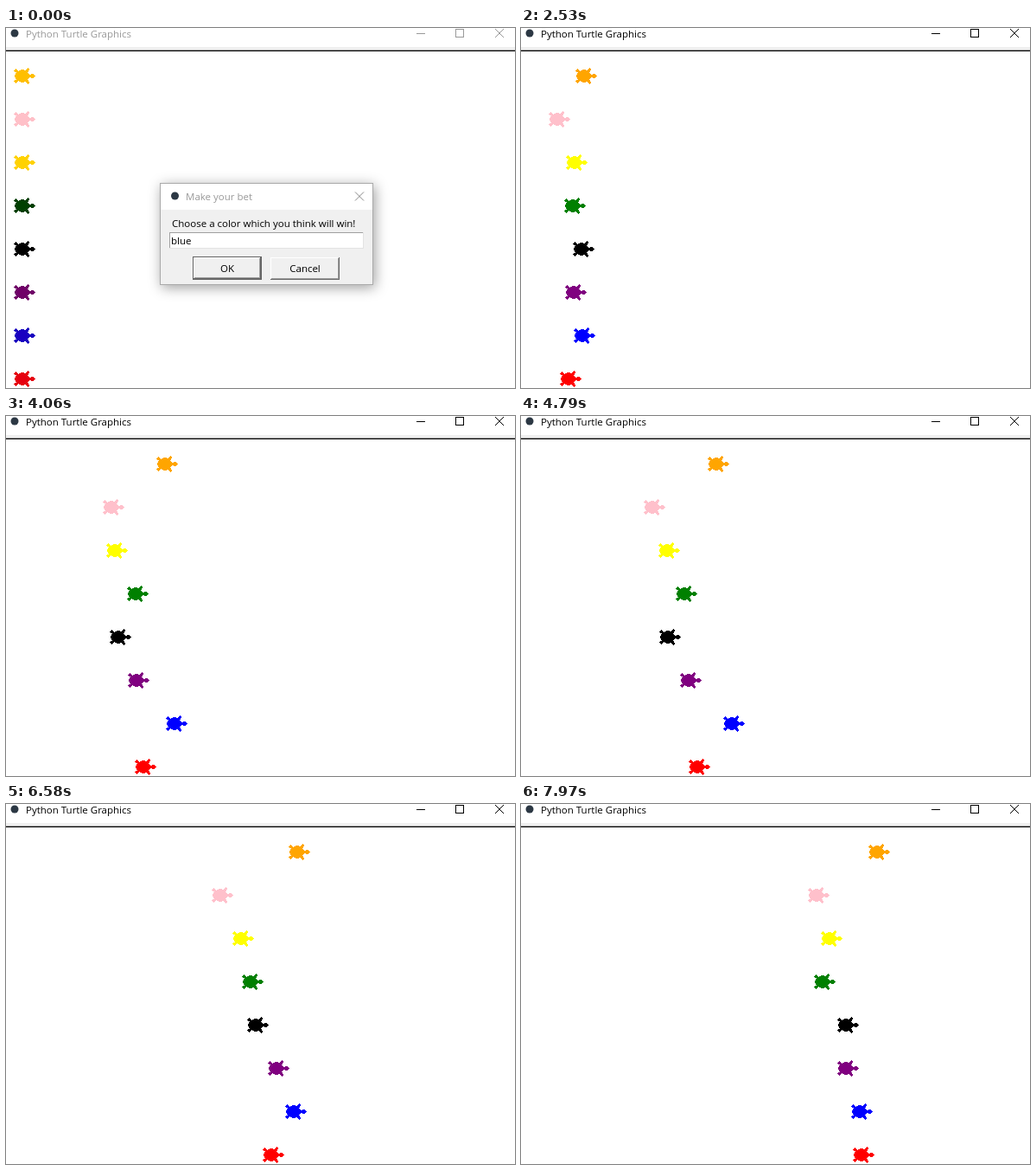
These frames come from a looping animation (589x416 px, 8 s). An HTML page with a canvas:

```html
<!DOCTYPE html>
<html lang="en">
<head>
<meta charset="utf-8">
<title>Turtle race</title>
<style>
  html, body { margin: 0; width: 100%; height: 100%; overflow: hidden; background: #fff; }
  canvas { display: block; }
</style>
</head>
<body>
<canvas id="stage" width="589" height="416"></canvas>
<script>
const ctx = document.getElementById('stage').getContext('2d');
const LOOP = 8000, CURSOR_IN = 330, CLICK = 1530, RACE = 1730, STEP = 66.37;
const FONT = '"Open Sans", "Noto Sans", sans-serif';

// Distance run at each of these times; extra holds [time, distance] pairs.
const TIMES = [1730, 2530, 4060, 5520, 6580, 7970];
const racers = [
  { idle: '#ffbf00', color: '#ffa500', run: [0, 54, 166, 248, 318, 393], extra: [[5980, 273], [6840, 331], [7710, 380]] },
  { idle: '#ffc0c8', color: '#ffc0cb', run: [0, 23, 103, 181, 229, 323],
    extra: [[3390, 74], [4260, 106], [5120, 151], [5980, 211], [6840, 244], [7710, 311]] },
  { idle: '#ffd200', color: '#ffff00', run: [0, 43, 107, 194, 253, 338] },
  { idle: '#004000', color: '#008000', run: [0, 41, 131, 210, 264, 330] },
  { idle: '#000000', color: '#000000', run: [0, 51, 111, 192, 270, 357] },
  { idle: '#700068', color: '#800080', run: [0, 42, 132, 219, 294, 357] },
  { idle: '#1a00c0', color: '#0000ff', run: [0, 52, 177, 258, 314, 373], extra: [[3390, 125], [4260, 195], [5120, 244], [5980, 274]] },
  { idle: '#e60010', color: '#ff0000', run: [0, 36, 140, 230, 288, 375] },
];

// Upper half of the turtle outline, nose first, heading right.
const HALF = [[16, 0], [14, 2], [10, 1], [7, 4], [9, 7], [8, 9], [5, 6], [1, 7],
  [-3, 5], [-6, 8], [-8, 6], [-5, 4], [-7, 0]];
const TURTLE = HALF.concat(HALF.slice(1, -1).reverse().map(([x, y]) => [x, -y]));
const ARROW = [[0, 0], [0, 16], [4, 12.5], [6.6, 18.3], [9, 17.3], [6.5, 11.5], [11.3, 11.5]];

function trace(c, points, x, y) {
  c.beginPath();
  points.forEach(([px, py]) => c.lineTo(x + px, y + py));
  c.closePath();
}

// Hard-edged turtle picture, centred on pixel (10, 10).
function makeSprite(color) {
  const sprite = document.createElement('canvas');
  sprite.width = 30;
  sprite.height = 21;
  const c = sprite.getContext('2d');
  c.fillStyle = c.strokeStyle = color;
  trace(c, TURTLE, 10.5, 10.5);
  c.fill();
  c.stroke();
  const img = c.getImageData(0, 0, 30, 21);
  const rgb = [1, 3, 5].map(i => parseInt(color.slice(i, i + 2), 16));
  for (let i = 0; i < img.data.length; i += 4) {
    img.data.set([...rgb, img.data[i + 3] > 120 ? 255 : 0], i);
  }
  c.putImageData(img, 0, 0);
  return sprite;
}

for (const r of racers) {
  r.idleSprite = makeSprite(r.idle);
  r.sprite = makeSprite(r.color);
  r.keys = TIMES.map((t, i) => [t, r.run[i]]).concat(r.extra || []).sort((a, b) => a[0] - b[0]);
}

function distance(keys, t) {
  if (t <= keys[0][0]) return 0;
  const i = keys.findIndex(k => k[0] >= t);
  if (i < 0) return keys[keys.length - 1][1];
  const [t0, d0] = keys[i - 1], [t1, d1] = keys[i];
  return Math.round(d0 + (d1 - d0) * (t - t0) / (t1 - t0));
}

function rect(x, y, w, h, color) {
  ctx.fillStyle = color;
  ctx.fillRect(x, y, w, h);
}

function frame(x, y, w, h, light, dark = light) {
  rect(x, y, w, 1, light);
  rect(x, y, 1, h, light);
  rect(x, y + h - 1, w, 1, dark);
  rect(x + w - 1, y, 1, h, dark);
}

function text(str, x, y, color, align = 'left') {
  ctx.font = '11.5px ' + FONT;
  ctx.textAlign = align;
  ctx.fillStyle = color;
  ctx.fillText(str, x, y);
}

function dot(x, y) {
  ctx.fillStyle = '#2c3844';
  ctx.beginPath();
  ctx.arc(x, y, 4.5, 0, Math.PI * 2);
  ctx.fill();
}

function cross(x, y, color) {
  ctx.strokeStyle = color;
  ctx.lineWidth = 1;
  ctx.beginPath();
  ctx.moveTo(x, y);
  ctx.lineTo(x + 10, y + 10);
  ctx.moveTo(x + 10, y);
  ctx.lineTo(x, y + 10);
  ctx.stroke();
}

function drawWindow(active) {
  const ink = active ? '#000' : '#999';
  rect(0, 0, 589, 416, '#fff');
  dot(10, 6);
  text('Python Turtle Graphics', 23, 11, ink);
  rect(475, 6, 10, 1, ink);
  frame(520, 1, 10, 10, ink);
  cross(566, 1, ink);
  rect(0, 22, 589, 3, '#f0f0f0');
  rect(0, 25, 589, 1, '#a0a0a0');
  rect(0, 26, 589, 1, '#000');
}

function button(label, x, y, w, h) {
  frame(x, y, w, h, '#fff', '#696969');
  frame(x + 1, y + 1, w - 2, h - 2, '#f0f0f0', '#a0a0a0');
  text(label, x + w / 2, 282, '#000', 'center');
}

function drawDialog() {
  ctx.save();
  ctx.shadowColor = 'rgba(0,0,0,.38)';
  ctx.shadowBlur = 14;
  ctx.shadowOffsetX = 2;
  ctx.shadowOffsetY = 3;
  rect(178, 179, 247, 118, '#aaa');
  ctx.restore();
  rect(179, 180, 245, 30, '#fff');
  rect(179, 210, 245, 86, '#f0f0f0');
  dot(195.5, 194);
  text('Make your bet', 208, 199, '#999');
  cross(404, 189.5, '#888');
  text('Choose a color which you think will win!', 192, 230, '#000');
  rect(189, 236, 225, 19, '#fff');
  frame(189, 236, 225, 19, '#a0a0a0', '#e3e3e3');
  text('blue', 191, 250, '#000');
  frame(216, 264, 80, 27, '#646464');
  button('OK', 217, 265, 78, 25);
  button('Cancel', 306, 265, 80, 26);
}

function cursorAt(t) {
  if (t >= 1200) return [262, 279];
  const k = Math.min(1, Math.floor((t - CURSOR_IN) / 66.6) / 12);
  const u = k * k * (3 - 2 * k), v = 1 - u;
  const curve = (a, b, c) => Math.round(a * v * v + 2 * b * u * v + c * u * u);
  return [curve(480, 330, 263), curve(404, 166, 277)];
}

function drawCursor(t) {
  const [x, y] = cursorAt(t);
  trace(ctx, ARROW, x + 0.5, y + 0.5);
  ctx.fillStyle = '#fff';
  ctx.strokeStyle = '#000';
  ctx.lineWidth = 1;
  ctx.fill();
  ctx.stroke();
}

function draw(t) {
  const racing = t >= RACE;
  const now = racing ? RACE + Math.floor((t - RACE) / STEP + 0.02) * STEP : 0;
  drawWindow(racing);
  racers.forEach((r, i) => {
    ctx.drawImage(racing ? r.sprite : r.idleSprite, 7 + distance(r.keys, now), 45 + i * 50);
  });
  if (t < CLICK) drawDialog();
  if (t >= CURSOR_IN && !racing) drawCursor(t);
}

const start = performance.now();
function tick() {
  draw((performance.now() - start) % LOOP);
  requestAnimationFrame(tick);
}
tick();
</script>
</body>
</html>
```
